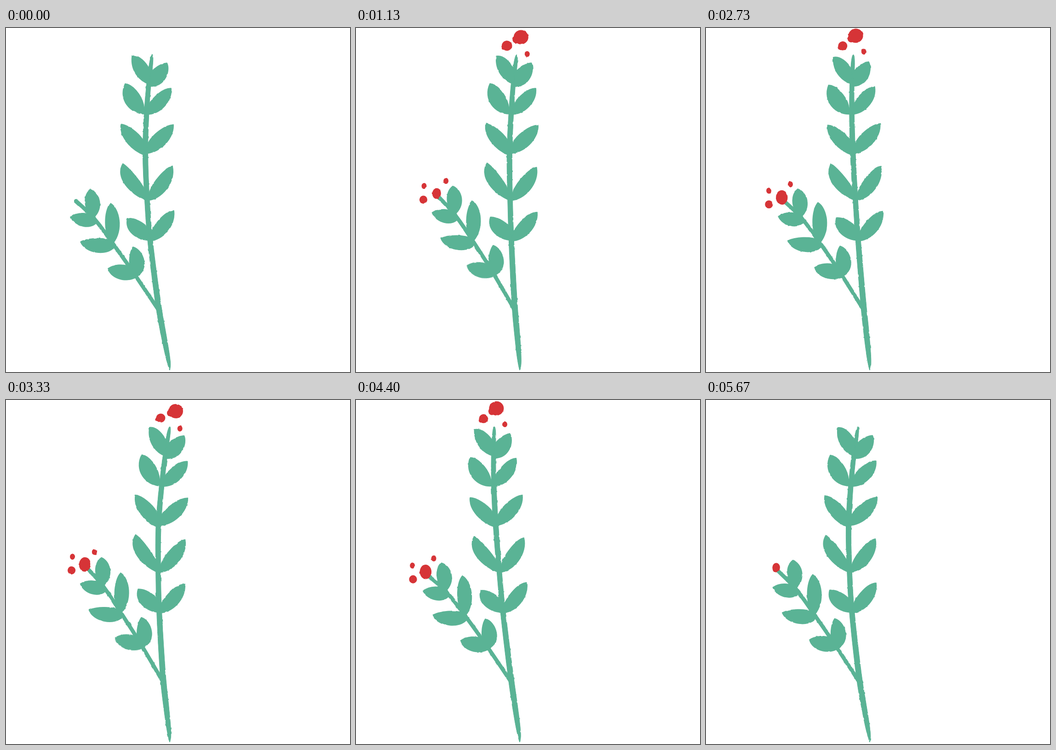
An HTML page for the animation above (5.74 s loop, 748 px wide and 748 px high).

```html
<!DOCTYPE html>
<html lang="en">
<head>
<meta charset="utf-8">
<title>Swaying sprig</title>
<style>
  html, body { margin: 0; width: 100%; height: 100%; overflow: hidden; background: #fff; }
  svg { display: block; width: 100vw; height: 100vh; }
</style>
</head>
<body>
<svg viewBox="0 0 748 748">
  <filter id="rough" filterUnits="userSpaceOnUse" x="0" y="0" width="748" height="748" color-interpolation-filters="sRGB">
    <feTurbulence id="noise" type="fractalNoise" baseFrequency="0.09" numOctaves="2" result="n"/>
    <feDisplacementMap in="SourceGraphic" in2="n" scale="2.6" xChannelSelector="R" yChannelSelector="G"/>
  </filter>
  <g id="plant" filter="url(#rough)" fill="#5ab395" stroke="#5ab395" stroke-linejoin="round"></g>
</svg>
<script>
const LOOP = 5740, FRAMES = 86, SWAY = 29; // a sway lasts 29 frames at 15 fps
const plant = document.getElementById('plant');
const noise = document.getElementById('noise');

// Swinging joints: mean x, x swing, x lag, mean y, y swing, y lag
const still = (x, swing, lag, y) => [x, swing, lag, y, 0, 0];
const STEM = [
  still(356, 0, 0, 744), still(355, .8, .05, 728), still(345.5, 4.5, .05, 660),
  still(338, 7, .05, 606), still(324, 13.5, .085, 460), still(319, 16, .105, 372),
  still(315, 18.8, .13, 272), still(317, 23, .165, 185), still(320.5, 26, .185, 120),
  still(327, 29.5, .2, 58), [335, 33, .215, 22, -5, .4]
];
const HALF_WIDTHS = [.3, 4.5, 6, 6, 5.5, 5.2, 5.7, 5.2, 4.8, 3.6];
const BRANCH = [
  still(337.5, 7, .05, 612), [289, 10, .08, 534.5, 2, .13], [243, 12, .09, 467.5, 3.5, .17],
  [202, 13.5, .1, 409.2, 6, .19], [159.5, 16, .11, 366, 8.5, .21]
];

// Leaf outlines in the pose of the first moment: chain, joint, path
const LEAVES = [
  [STEM, 8, 'M311 122C292 116 270 95 274 61C290 58 305 76 311 88Z'],
  [STEM, 8, 'M314 97C322 88 336 77 350 76C358 92 347 128 313 127Z'],
  [STEM, 7, 'M303 187C270 188 243 155 259 121C275 122 294 145 299 166Z'],
  [STEM, 7, 'M311 166C320 150 342 130 359 131C362 160 335 188 306 188Z'],
  [STEM, 6, 'M302 277C270 265 246 235 250 209C265 210 288 228 297 242Z'],
  [STEM, 6, 'M309 250C318 232 345 211 364 210C366 240 335 272 303 273Z'],
  [STEM, 5, 'M306 375C270 362 236 325 254 295C266 302 292 332 302 352Z'],
  [STEM, 5, 'M313 354C320 335 345 304 362 301C370 335 338 374 307 375Z'],
  [STEM, 4, 'M314 462C285 462 257 442 264 414C280 412 300 424 308 434Z'],
  [STEM, 4, 'M317 441C325 425 345 398 365 397C370 430 340 462 313 463Z'],
  [BRANCH, 3, 'M190 413C175 406 162 368 183 351C204 358 214 392 190 413Z'],
  [BRANCH, 3, 'M194 411C180 400 155 400 141 411C150 432 185 440 198 422Z'],
  [BRANCH, 2, 'M230 467C212 450 212 398 227 381C247 392 256 440 233 468Z'],
  [BRANCH, 2, 'M230 463C212 454 178 457 162 465C172 490 220 497 236 476Z'],
  [BRANCH, 1, 'M270 520C266 505 270 485 276 476C300 482 314 528 282 541Z'],
  [BRANCH, 1, 'M272 520C255 512 235 514 222 523C228 548 270 556 288 538Z']
];

// Berries around the end of a chain: dx, dy, rx, ry, bump size, grow start, shrink start
const BERRIES = [
  [STEM, 1, 0, 16, 15.5, 8, 11, 79],
  [STEM, -31, 16, 10, 9.7, 4.5, 14, 80],
  [STEM, 11.5, 37.5, 5.5, 6.3, 0, 5, 75],
  [BRANCH, 0, 0, 12.7, 15.7, 0, 16, 84.1],
  [BRANCH, -28, 15, 8.6, 8.8, 0, 4, 76.7],
  [BRANCH, -28.2, -14.8, 5.5, 6.5, 0, 2, 75],
  [BRANCH, 18.7, -28.5, 5.5, 6.5, 0, 3, 75.5]
];

const add = (name, attrs = {}) => {
  const el = document.createElementNS('http://www.w3.org/2000/svg', name);
  for (const key in attrs) el.setAttribute(key, attrs[key]);
  return plant.appendChild(el);
};

const wave = (k, lag) => Math.cos(2 * Math.PI * (k / SWAY - lag));
const place = ([x, ax, lx, y, ay, ly], k) => [x - ax * wave(k, lx), y + ay * wave(k, ly)];

// Direction of a chain at joint i, in degrees
function heading(chain, i, k) {
  const [x0, y0] = place(chain[i - 1], k);
  const [x1, y1] = place(chain[Math.min(i + 1, chain.length - 1)], k);
  return Math.atan2(y1 - y0, x1 - x0) * 180 / Math.PI;
}
const turn = (chain, i, k) => heading(chain, i, k) - heading(chain, i, 0);

function smooth(pts) {
  let d = `M${pts[0]}`;
  for (let i = 1; i < pts.length - 1; i++) {
    const [x, y] = pts[i], [u, v] = pts[i + 1];
    d += `Q${x} ${y} ${(x + u) / 2} ${(y + v) / 2}`;
  }
  return `${d}L${pts[pts.length - 1]}`;
}

function berrySize(k, start, end) {
  if (k <= start) return 0;
  if (k > end) return Math.max(0, 1 - (k - end) / 2.6);
  const x = Math.min(1, (k - start) / 5) - 1;
  return 1 + 3 * x ** 3 + 2 * x ** 2; // overshoots, then settles
}

const stem = add('path');
const branch = add('path', { fill: 'none', 'stroke-width': 8.5, 'stroke-linecap': 'round' });
const leaves = LEAVES.map(([, , d]) => add('path', { d, 'stroke-width': 1.6 }));
const berries = BERRIES.map(([, , , rx, ry, bump]) => {
  const g = add('g', { fill: '#d63437', stroke: 'none' });
  g.append(add('ellipse', { rx, ry }));
  if (bump) g.append(add('circle', { cx: -rx * .68, cy: ry * .28, r: bump }));
  return g;
});

function draw(k) {
  noise.setAttribute('seed', k + 1);

  const spine = STEM.slice(0, -1).map(joint => place(joint, k));
  const side = sign => spine.map(([x, y], i) => [x + sign * HALF_WIDTHS[i], y]);
  stem.setAttribute('d', smooth([...side(-1), ...side(1).reverse()]));

  const twig = BRANCH.map(joint => place(joint, k));
  const end = twig.pop();
  branch.setAttribute('d', smooth([...twig, [end[0] + 5, end[1] + 8]]));

  LEAVES.forEach(([chain, i], n) => {
    const [x, y] = place(chain[i], k), [x0, y0] = place(chain[i], 0);
    leaves[n].setAttribute('transform',
      `translate(${x} ${y}) rotate(${turn(chain, i, k)}) translate(${-x0} ${-y0})`);
  });

  BERRIES.forEach(([chain, dx, dy, , , , start, stop], n) => {
    const last = chain.length - 1, [x, y] = place(chain[last], k);
    const size = berrySize(k, start, stop);
    berries[n].setAttribute('display', size ? 'inline' : 'none');
    berries[n].setAttribute('transform',
      `translate(${x} ${y}) rotate(${turn(chain, last, k)}) translate(${dx} ${dy}) scale(${size})`);
  });
}

let shown = -1;
function tick() {
  const t = performance.now() % LOOP;
  const k = Math.min(FRAMES - 1, Math.floor((t + 4) * .015));
  if (k !== shown) draw(shown = k);
  requestAnimationFrame(tick);
}
tick();
</script>
</body>
</html>
```
